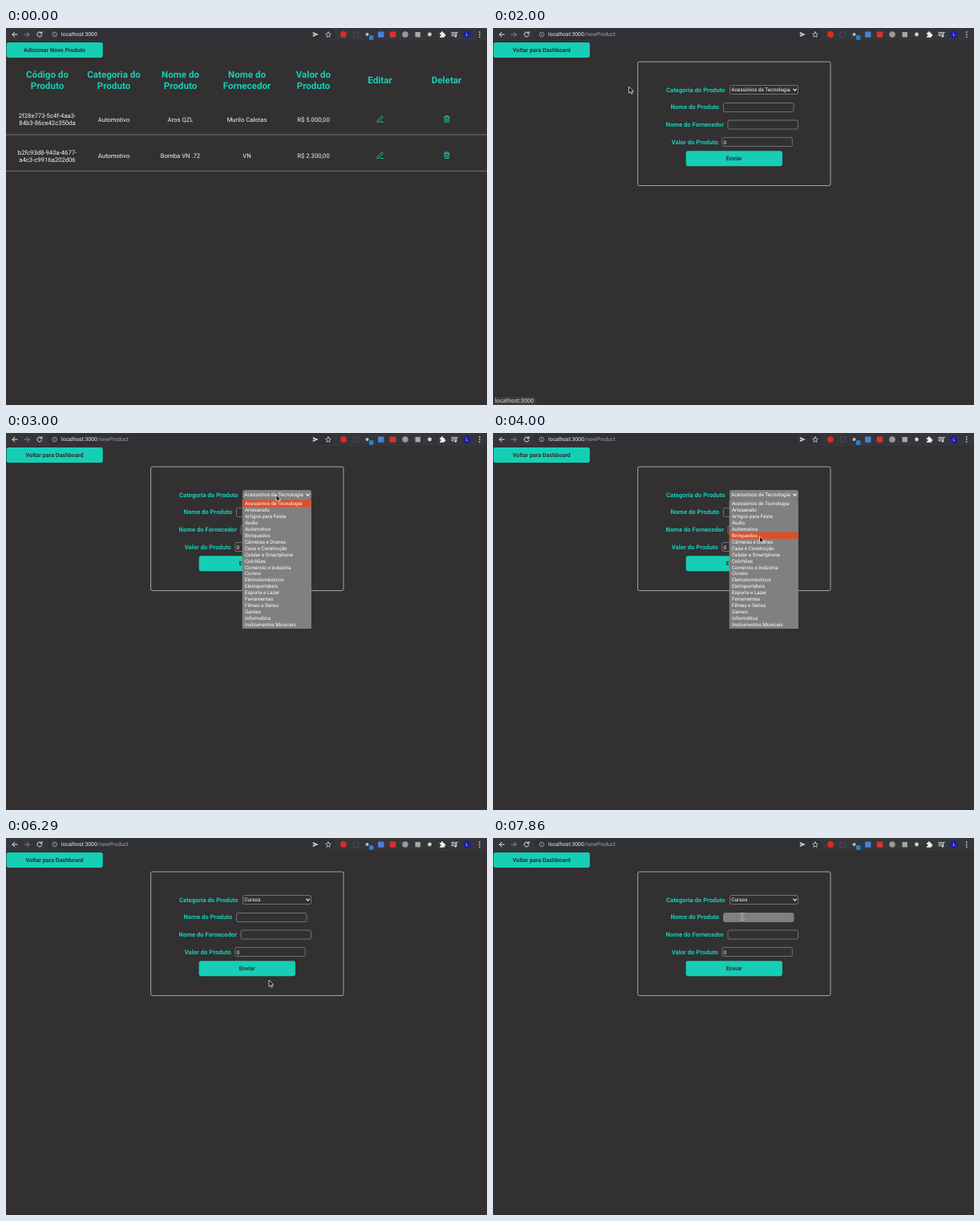
An HTML page for the animation above (8000 ms loop, 600 px wide and 470 px high).

```html
<!DOCTYPE html>
<html lang="pt-BR">
<head>
<meta charset="utf-8">
<title>Cadastro de produtos</title>
<style>
  html, body { margin: 0; width: 100%; height: 100%; overflow: hidden; background: #323031; }
  svg { display: block; width: 600px; height: 470px; font-family: Roboto, sans-serif; text-rendering: geometricPrecision; }
  .bold { font-weight: 700; }
  .mid { text-anchor: middle; }
  .line { fill: none; stroke-linecap: round; stroke-linejoin: round; }
</style>
</head>
<body>
<svg id="stage" viewBox="0 0 600 470"></svg>
<script>
const LOOP = 8000, FPS = 7;
const BG = '#323031', TEAL = '#16ceb6', GREY = '#808080', ORANGE = '#e24c23';
const PITCH = 7.97, LIST_TOP = 84;
const PAGE_AT = 12, OPEN_AT = 20, CLOSE_AT = 44, FOCUS_AT = 51, BLINK_AT = 55;

const stage = document.getElementById('stage');

function add(parent, tag, attrs = {}, content) {
  const el = document.createElementNS('http://www.w3.org/2000/svg', tag);
  for (const key in attrs) el.setAttribute(key, attrs[key]);
  if (content !== undefined) el.textContent = content;
  parent.append(el);
  return el;
}
const group = parent => add(parent, 'g');
const rect = (p, x, y, width, height, fill, more) =>
  add(p, 'rect', { x, y, width, height, fill, ...more });
const circle = (p, cx, cy, r, fill, more) => add(p, 'circle', { cx, cy, r, fill, ...more });
const text = (p, x, y, size, fill, content, cls = '') =>
  add(p, 'text', { x, y, 'font-size': size, fill, class: cls }, content);
const line = (p, d, stroke, width = 1) =>
  add(p, 'path', { d, stroke, 'stroke-width': width, class: 'line' });
const show = (el, on) => el.setAttribute('visibility', on ? 'visible' : 'hidden');

function button(p, x, y, label) {
  rect(p, x, y, 120.2, 19, TEAL, { rx: 2.4 });
  text(p, x + 60, y + 12.1, 7.2, BG, label, 'bold mid');
}

function box(p, x, y, w) {
  return rect(p, x + .5, y + .5, w - 1, 11, BG, { rx: 2, stroke: '#858385', 'stroke-width': .8 });
}

// Dashboard
rect(stage, 0, 0, 600, 470, BG);
const dashboard = group(stage);
button(dashboard, .6, 18, 'Adicionar Novo Produto');

const column = i => 51.5 + 83 * i;
[['Código do', 'Produto'], ['Categoria do', 'Produto'], ['Nome do', 'Produto'],
 ['Nome do', 'Fornecedor'], ['Valor do', 'Produto'], ['Editar'], ['Deletar']]
  .forEach((lines, i) => lines.forEach((s, k) =>
    text(dashboard, column(i), (lines.length > 1 ? 62.2 : 69) + 13.6 * k, 11.6, TEAL, s, 'bold mid')));

[[['2f28e773-5c4f-4aa3-', '84b3-86ce42c350da'], 'Automotivo', 'Aros QZL', 'Murilo Calotas', 'R$ 5.000,00'],
 [['b2fc93d8-940a-4677-', 'a4c3-c9916a202d06'], 'Automotivo', 'Bomba VN .72', 'VN', 'R$ 2.300,00']]
  .forEach(([code, ...cells], row) => {
    const y = 45.3 * row;
    const cell = (x, base, s) => text(dashboard, x, base + y, 7.7, '#f4f4f4', s, 'mid');
    code.forEach((s, k) => cell(column(0), 112.2 + 9 * k, s));
    cells.forEach((s, i) => cell(column(i + 1), 116.9, s));
    const icons = group(dashboard);
    icons.setAttribute('transform', `translate(0 ${y})`);
    line(icons, 'M463 117l.5-2.2 5.2-5.2 1.7 1.7-5.2 5.2zM466.8 117.2h4', TEAL, .9);
    line(icons, 'M546.2 111h7.2M548.3 111v-1.5h3v1.5M547 111l.4 6.2h4.8l.4-6.2M549 112.8v2.8M550.7 112.8v2.8', TEAL, .9);
    rect(dashboard, 0, 132.6 + y, 600, .8, '#858385');
  });

// Form
const form = group(stage);
button(form, .6, 18, 'Voltar para Dashboard');
rect(form, 180.6, 42.1, 240.4, 154.4, 'none', { rx: 2, stroke: '#b4b4b4', 'stroke-width': .9 });
[['Categoria do Produto', 216], ['Nome do Produto', 221.5], ['Nome do Fornecedor', 215.5], ['Valor do Produto', 222.7]]
  .forEach(([s, x], i) => text(form, x, 79.6 + 21.7 * i, 7.7, TEAL, s, 'bold'));

const fields = [[295, 71, 86], [287, 93, 88.5], [292.5, 114.5, 88.5], [285.3, 136, 88.5]]
  .map(([x, y, w]) => ({ x, y, w, el: box(form, x, y, w) }));
const chosen = text(form, 297.3, 79.4, 6.43, '#fff', '');
line(form, 'M374.8 76.2l1.8 1.9 1.8-1.9', '#fff', 1.1);
text(form, 287.6, 144.6, 6.43, '#fff', '0');
button(form, 240.7, 153.2, 'Enviar');
const caret = rect(form, 288, 95, .8, 8, '#fff');

// Category list
const items = ['Acessórios de Tecnologia', 'Artesanato', 'Artigos para Festa', 'Áudio', 'Automotivo',
  'Brinquedos', 'Câmeras e Drones', 'Casa e Construção', 'Celular e Smartphone', 'Colchões',
  'Comércio e Indústria', 'Cursos', 'Eletrodomésticos', 'Eletroportáteis', 'Esporte e Lazer',
  'Ferramentas', 'Filmes e Séries', 'Games', 'Informática', 'Instrumentos Musicais'];
const list = group(stage);
rect(list, 294.7, 83, 86.2, 161, GREY);
const mark = rect(list, 295, 0, 85.7, PITCH, ORANGE);
items.forEach((s, i) => text(list, 298, 89.8 + PITCH * i, 6.25, '#fff', s));

// Status bubble
const status = group(stage);
const bubble = rect(status, -2, 460, 56, 12, '#3d3c3e', { rx: 2 });
const statusText = add(status, 'text', {
  x: 2.5, y: 467.4, 'font-size': 7.15, fill: '#e6e6e6', 'font-family': '"Noto Sans", sans-serif' });

// Browser bar
const bar = group(stage);
rect(bar, 0, 0, 600, 16, '#35363a');
rect(bar, 52, 1.2, 358, 13.6, '#303135', { rx: 6.8 });
line(bar, 'M14 8.1H8M10.8 5.2L8 8.1l2.8 2.9', '#e8eaed');
line(bar, 'M23 8.1h6M26.2 5.2L29 8.1l-2.8 2.9', '#85868a');
line(bar, 'M44.4 6.2a3 3 0 1 0 .5 2.5M44.9 4.6v2.2h-2.2', '#e8eaed');
circle(bar, 60.7, 8, 2.9, 'none', { stroke: '#b4b6ba', 'stroke-width': .7 });
line(bar, 'M60.7 7.7v1.7M60.7 6.5v.1', '#b4b6ba', .7);
const url = text(bar, 69, 10.4, 6.8, '#eceef0', 'localhost:3000');
const path = add(url, 'tspan', { fill: '#a0a2a6' }, '/newProduct');
add(bar, 'path', { d: 'M382.8 5l7 3-7 3v-2.3l4-.7-4-.7z', fill: '#d4d6d9' });
line(bar, 'M402 4.8l1 2.2 2.3.3-1.7 1.6.4 2.4-2-1.2-2 1.2.4-2.4-1.7-1.6 2.3-.3z', '#d4d6d9', .8);
circle(bar, 421, 8, 3.9, '#d92b22');
rect(bar, 433, 5, 6.4, 6.4, 'none', { stroke: '#66686b', 'stroke-width': .8, 'stroke-dasharray': '1 1' });
circle(bar, 450.5, 8, 2, '#b9bbbe');
rect(bar, 453, 9.3, 5.4, 5.4, '#1e88d8', { rx: .6 });
rect(bar, 464, 4.4, 7.4, 7.4, '#4a80d8', { rx: .8 });
rect(bar, 478.7, 4.4, 7.6, 7.4, '#d8322c', { rx: .8 });
circle(bar, 498, 8, 3.8, '#97999c');
rect(bar, 510.5, 5, 6.4, 6.4, '#a6a7a9');
circle(bar, 528.5, 8, 2.4, '#d0d2d4');
add(bar, 'path', { fill: '#eceef0',
  d: 'M541 6h1.8a1.2 1.2 0 1 1 2.2 0h1.8v1.8a1.2 1.2 0 1 1 0 2.3v1.7H541v-1.7a1.2 1.2 0 1 0 0-2.3z' });
line(bar, 'M555.8 5.6h5M555.8 7.6h5M555.8 9.6h2.8M561.8 10V5.4h1.6', '#eceef0', .9);
circle(bar, 560.8, 10.2, 1.2, '#eceef0');
circle(bar, 575, 8, 5.1, '#20209a');
text(bar, 575, 10, 5.4, '#e6e6f4', 'L', 'mid');
[5, 8, 11].forEach(y => circle(bar, 590.8, y, .85, '#eceef0'));

// Pointers
const arrow = add(stage, 'path', { d: 'M0 0v8.2l1.9-1.7 1.3 2.9 1.4-.6-1.3-2.8h2.6z',
  fill: '#141414', stroke: '#fff', 'stroke-width': .7, 'stroke-linejoin': 'round' });
const beam = group(stage);
for (const [color, width] of [['#fff', 1.7], ['#222', .7]])
  line(beam, 'M-1.6-3.6q1.6 0 1.6.8v5.6q0 .8-1.6.8M1.6-3.6q-1.6 0-1.6.8M0 2.8q0 .8 1.6.8', color, width);

// Pointer path: step, x, y
const moves = [[1, 250, 4], [4, 190, 120], [5, 175, 145], [8, 105, 40], [9, 92, 29], [12, 92, 29],
  [14, 169.5, 73], [17, 255, 84], [20, 337, 77], [22, 337, 77], [25, 335, 102], [28, 332.5, 128.6],
  [32, 331, 155], [39, 331, 155], [42, 328, 177], [44, 328, 177], [47, 303.5, 108.8], [51, 311, 98]];

function pointerAt(step) {
  const k = moves.findIndex(m => m[0] > step);
  if (k < 0) return moves[moves.length - 1].slice(1);
  if (k === 0) return moves[0].slice(1);
  const [s0, x0, y0] = moves[k - 1], [s1, x1, y1] = moves[k];
  const u = (step - s0) / (s1 - s0);
  return [x0 + (x1 - x0) * u, y0 + (y1 - y0) * u];
}

function draw(step) {
  const [x, y] = pointerAt(step);
  const onForm = step >= PAGE_AT;
  const open = step >= OPEN_AT && step < CLOSE_AT;

  show(dashboard, !onForm);
  show(form, onForm);
  path.textContent = onForm ? '/newProduct' : '';

  show(list, open);
  const row = Math.max(0, Math.floor((y - LIST_TOP) / PITCH));
  mark.setAttribute('y', LIST_TOP + PITCH * row);
  chosen.textContent = items[step < CLOSE_AT ? 0 : 11];

  // The select keeps its hover fill while its list is open
  let typing = false;
  fields.forEach((f, i) => {
    const inside = onForm && x > f.x && x < f.x + f.w && y > f.y && y < f.y + 12;
    const lit = open ? i === 0 : inside;
    f.el.setAttribute('fill', lit ? GREY : BG);
    typing = typing || (lit && i > 0);
  });
  show(caret, step >= FOCUS_AT && step < BLINK_AT);

  show(status, step >= 9 && step < 17);
  statusText.textContent = 'localhost:3000' + (onForm ? '' : '/newProduct');
  bubble.setAttribute('width', onForm ? 56 : 97);

  show(arrow, step > 0 && !typing);
  show(beam, typing);
  for (const el of [arrow, beam]) el.setAttribute('transform', `translate(${x} ${y})`);
}

const start = performance.now();
let last = -1;
function tick() {
  const t = (performance.now() - start) % LOOP;
  const step = Math.floor((t + 5) * FPS / 1000) % (LOOP * FPS / 1000);
  if (step !== last) draw(last = step);
  requestAnimationFrame(tick);
}
tick();
</script>
</body>
</html>
```
